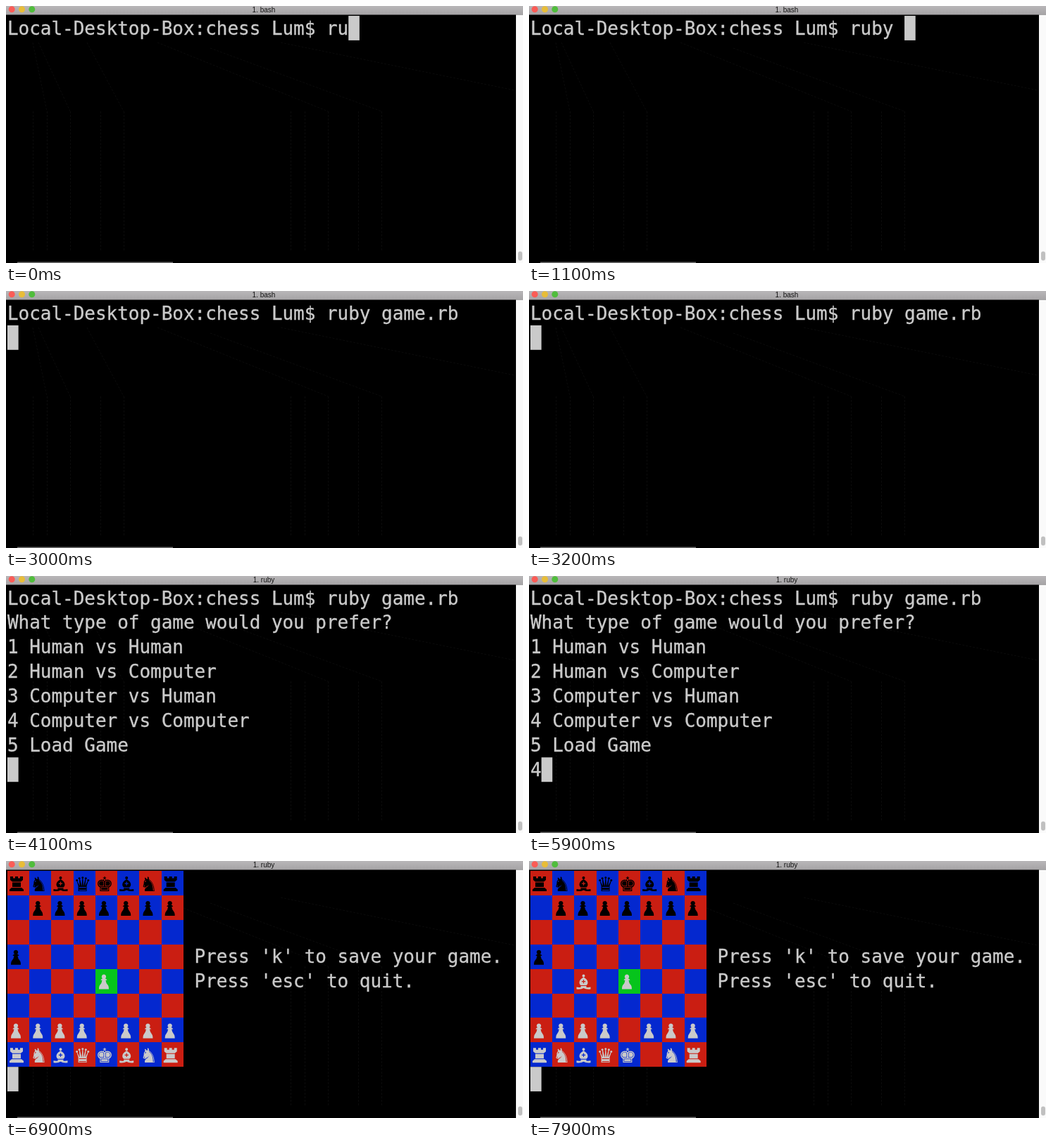
Write an HTML page with a canvas that moves like this. It is 734 px wide and 366 px high and loops after 8000 ms.

```html
<!DOCTYPE html>
<html lang="en">
<head>
<meta charset="utf-8">
<title>Terminal chess</title>
<style>
  html, body { margin: 0; width: 100%; height: 100%; overflow: hidden; background: #000; }
  canvas { display: block; }
</style>
</head>
<body>
<canvas id="stage" width="734" height="366"></canvas>
<script>
const ctx = document.getElementById('stage').getContext('2d');
const LOOP = 8000;
const CELL = { w: 15.62, h: 34.9, left: 2, top: 14 };
const INK = '#cacaca', RED = '#ca1e12', BLUE = '#0428cf', GREEN = '#06c41c';

const PROMPT = 'Local-Desktop-Box:chess Lum$ ';
const COMMAND = 'ruby game.rb';
const KEY_TIMES = [0, 0, 300, 500, 800, 1200, 1400, 1600, 1800, 2000, 2200, 2400];
const ENTER = 2700, MENU = 3300, RETITLE = 3700, CHOICE = 4500, BOARD = 6100;
const MENU_LINES = [
  'What type of game would you prefer?',
  '1 Human vs Human',
  '2 Human vs Computer',
  '3 Computer vs Human',
  '4 Computer vs Computer',
  '5 Load Game'
];

const START = ['rnbqkbnr', 'pppppppp', '', '', '', '', 'PPPPPPPP', 'RNBQKBNR'];
const GLYPHS = { n: '♞', q: '♛', k: '♚' };
// Outlines are centred on x = 0 and stand on y = 0.
const SHAPES = {
  r: new Path2D('M-9-21h4v2.5h3v-2.5h4v2.5h3v-2.5h4v5l-3 2.5h-12l-3-2.5z' +
    'M-6-12.5h12v6.5h-12zM-7-5h14l3 2.5v2.5h-20v-2.5z'),
  b: new Path2D('M0-21a2 2 0 0 1 0 4a2 2 0 0 1 0-4z' +
    'M0-17c4 2 6 5 6 7.5 0 2-1 3-2 4h-8c-1-1-2-2-2-4 0-2.5 2-5.5 6-7.5z' +
    'M-.6-13.5h1.2v2h2v1.2h-2v2h-1.2v-2h-2v-1.2h2z' +
    'M-4-4.5h8v2q2 0 6-.5v3q-7 .5-10-1.5q-3 2-10 1.5v-3q4 .5 6 .5z'),
  p: new Path2D('M0-21a3.2 3.2 0 0 1 2 5.7q2.5 1 2.5 2.5h-2q.5 4.5 3 6.8q1.5 1.5 1.5 6' +
    'h-14q0-4.5 1.5-6q2.5-2.3 3-6.8h-2q0-1.5 2.5-2.5a3.2 3.2 0 0 1 2-5.7z')
};
const PIECE_HEIGHT = 21;
// Squares are [row, column].
const MOVES = [
  { at: 6500, from: [6, 4], to: [4, 4] },
  { at: 6900, from: [1, 0], to: [3, 0] },
  { at: 7700, from: [7, 5], to: [4, 2] }
];
const SELECTED = [4, 4];

const colX = col => CELL.left + col * CELL.w;
const rowY = row => CELL.top + row * CELL.h;

function rect(color, x, y, w, h) {
  ctx.fillStyle = color;
  ctx.fillRect(x, y, w, h);
}

function disc(color, x, y, r) {
  ctx.fillStyle = color;
  ctx.beginPath();
  ctx.arc(x, y, r, 0, Math.PI * 2);
  ctx.fill();
}

function print(text, row, col = 0) {
  ctx.font = '26px "DejaVu Sans Mono", monospace';
  ctx.textAlign = 'left';
  ctx.fillStyle = ctx.strokeStyle = INK;
  ctx.lineWidth = 0.35;
  [...text].forEach((char, i) => {
    const x = colX(col + i), y = rowY(row) + 26.5;
    ctx.fillText(char, x, y);
    ctx.strokeText(char, x, y);
  });
}

function cursor(row, col) {
  rect(INK, colX(col), rowY(row), CELL.w, CELL.h);
}

function drawGlyph(glyph, x, y) {
  const setSize = size => { ctx.font = `${size}px "DejaVu Sans", sans-serif`; };
  ctx.textAlign = 'left';
  setSize(100);
  const box = ctx.measureText(glyph);
  const scale = PIECE_HEIGHT / (box.actualBoundingBoxAscent + box.actualBoundingBoxDescent);
  const middle = (box.actualBoundingBoxRight - box.actualBoundingBoxLeft) / 2;
  setSize(100 * scale);
  ctx.fillText(glyph, x - middle * scale, y - box.actualBoundingBoxDescent * scale);
}

function drawPiece(piece, row, col) {
  const kind = piece.toLowerCase();
  const x = colX(col * 2) + (kind === 'p' ? 12 : 13), y = rowY(row) + 29;
  ctx.fillStyle = piece === kind ? '#000' : INK;
  if (GLYPHS[kind]) return drawGlyph(GLYPHS[kind] + '\uFE0E', x, y);
  ctx.save();
  ctx.translate(x, y);
  ctx.fill(SHAPES[kind], 'evenodd');
  ctx.restore();
}

function positionAt(time) {
  const squares = START.map(line => [...line.padEnd(8)]);
  for (const { at, from, to } of MOVES) {
    if (time < at) break;
    squares[to[0]][to[1]] = squares[from[0]][from[1]];
    squares[from[0]][from[1]] = ' ';
  }
  return squares;
}

function drawBoard(time) {
  positionAt(time).forEach((line, row) => line.forEach((piece, col) => {
    const selected = row === SELECTED[0] && col === SELECTED[1];
    const x = Math.round(colX(col * 2)), y = Math.round(rowY(row));
    const right = Math.round(colX(col * 2 + 2)), bottom = Math.round(rowY(row + 1));
    rect(selected ? GREEN : (row + col) % 2 ? BLUE : RED, x, y, right - x, bottom - y);
    if (piece !== ' ') drawPiece(piece, row, col);
  }));
  print("Press 'k' to save your game.", 3, 17);
  print("Press 'esc' to quit.", 4, 17);
  cursor(8, 0);
}

function drawShell(time) {
  const typed = COMMAND.slice(0, KEY_TIMES.filter(t => t <= time).length);
  const line = PROMPT + typed;
  print(line, 0);
  if (time < ENTER) return cursor(0, line.length);
  if (time < MENU) return cursor(1, 0);
  MENU_LINES.forEach((text, i) => print(text, i + 1));
  const choice = time < CHOICE ? '' : '4';
  print(choice, 7);
  cursor(7, choice.length);
}

// Faint picture showing through the translucent window: two similar halves.
function drawBackdrop() {
  ctx.strokeStyle = '#0b0b0b';
  ctx.lineWidth = 1;
  ctx.setLineDash([3, 2]);
  ctx.beginPath();
  const line = (x1, y1, x2, y2) => { ctx.moveTo(x1, y1); ctx.lineTo(x2, y2); };
  for (const left of [0, 366]) {
    for (const x of [38, 58, 91, 134, 167]) line(left + x + 0.5, 150, left + x + 0.5, 350);
  }
  line(38, 52, 58, 150);
  line(46, 52, 91, 150);
  line(115, 52, 167, 150);
  line(215, 52, 457, 150);
  line(290, 60, 533, 150);
  line(390, 52, 722, 120);
  ctx.stroke();
  ctx.setLineDash([]);
}

function drawWindow(time) {
  const bar = ctx.createLinearGradient(0, 0, 0, 13);
  bar.addColorStop(0, '#b8b6b8');
  bar.addColorStop(1, '#a5a3a5');
  rect(bar, 0, 0, 734, 12.5);
  ['#fb5c56', '#e8bd38', '#50bd3c'].forEach((color, i) => disc(color, 8.2 + i * 14.3, 4.8, 4.5));
  ctx.font = '10px "Liberation Sans", Arial, sans-serif';
  ctx.textAlign = 'center';
  ctx.fillStyle = '#111';
  ctx.fillText(time < RETITLE ? '1. bash' : '1. ruby', 366, 8.6);

  rect('#fafafa', 724, 12.5, 10, 353.5);
  ctx.fillStyle = '#c0c0c0';
  ctx.beginPath();
  ctx.roundRect(727, 349.5, 6, 13, 3);
  ctx.fill();
  rect('#6c6c6c', 16, 364.5, 221, 1.5);
}

function draw(time) {
  rect('#000', 0, 0, 734, 366);
  drawBackdrop();
  drawWindow(time);
  (time < BOARD ? drawShell : drawBoard)(time);
}

let start;
function tick(now) {
  start ??= now;
  draw((now - start) % LOOP);
  requestAnimationFrame(tick);
}
draw(0);
requestAnimationFrame(tick);
</script>
</body>
</html>
```
